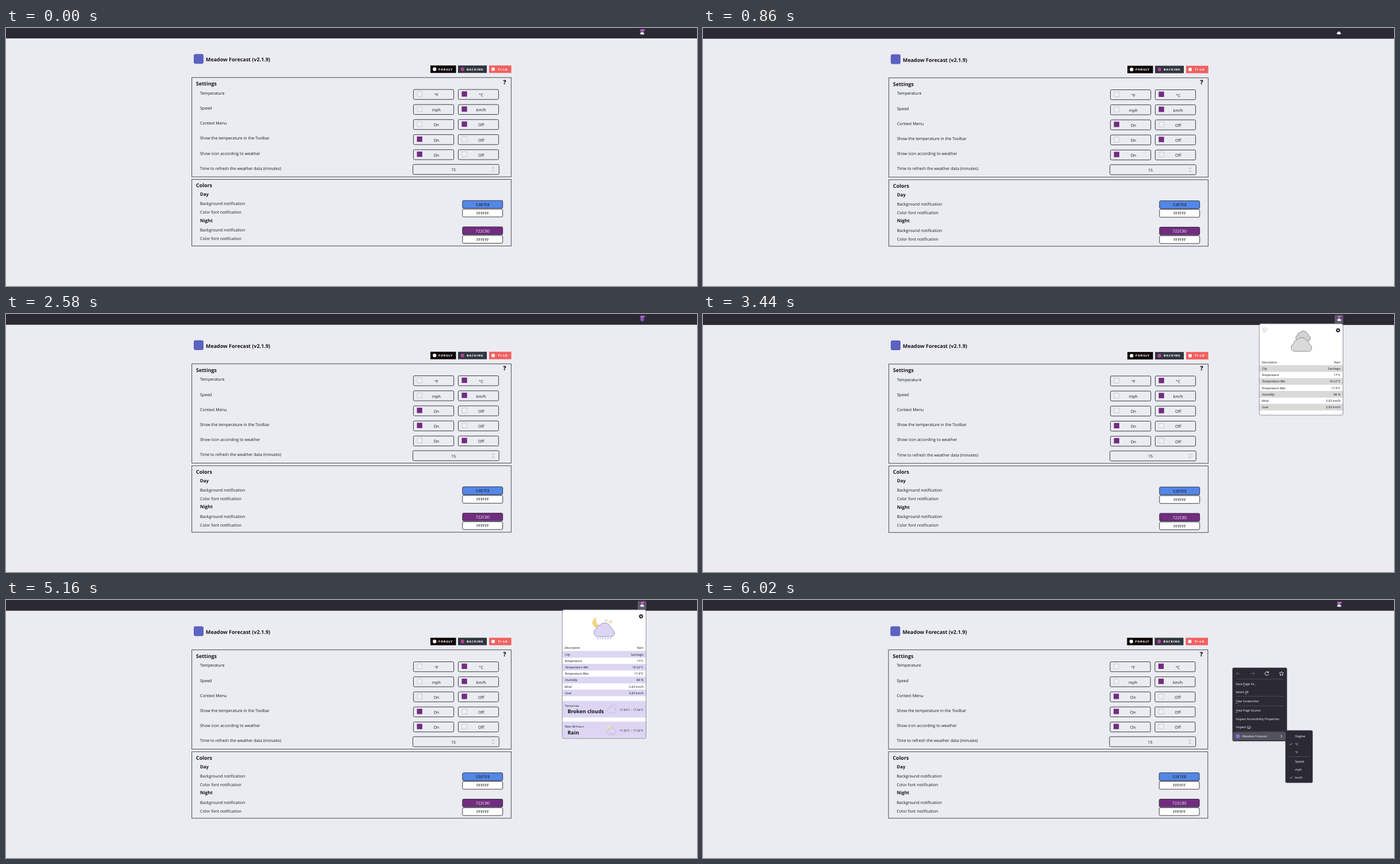
These frames come from a looping animation (1200x449 px, 6880 ms). An HTML page:

```html
<!DOCTYPE html>
<html lang="en">
<head>
<meta charset="utf-8">
<title>Weather settings</title>
<style>
  html, body { margin: 0; width: 100%; height: 100%; overflow: hidden; background: #ebecf2; }
  svg { display: block; width: 100vw; height: 100vh; }
  text { font-family: "Open Sans", "Noto Sans", sans-serif; font-size: 7.05px; fill: #15141a; text-rendering: geometricPrecision; white-space: pre; }
  .b { font-weight: 700; font-size: 8.95px; }
  .sub { font-weight: 700; font-size: 7.9px; }
  .badge { font: 700 4.8px "DejaVu Sans", sans-serif; letter-spacing: .7px; fill: #fff; }
  .row { font-size: 5.4px; }
  .it { font-style: italic; }
  .small { font-size: 5.1px; }
  .menu { font-size: 5.3px; fill: #fbfbfe; }
  .u { text-decoration: underline; text-decoration-thickness: .5px; }
  .mid { text-anchor: middle; }
  .end { text-anchor: end; }
</style>
</head>
<body>
<svg id="stage" viewBox="0 0 1200 449" preserveAspectRatio="none"></svg>
<script>
const STEP = 860;
const PURPLE = '#722c80', INK = '#2b2a33', LILAC = '#dcd6f3';
const CLOUD = 'M7 26A7 7 0 0 1 5 12.5A6 6 0 0 1 11 6A10 10 0 0 1 28 8A7 7 0 0 1 32 14A6.3 6.3 0 0 1 31 26Z';

// picks: chosen side per row (0 left, 1 right)
const states = [
  { picks: '01100', dx: 0, dy: 0, bar: 18.1, icon: 'cloud', badge: 1 },
  { picks: '11010', dx: 0, dy: .5, bar: 18.7, icon: 'cloud' },
  { picks: '11011', dx: 0, dy: .8, bar: 18.7, icon: 'dot' },
  { picks: '11001', dx: 0, dy: .5, bar: 18.7, icon: 'dot', badge: 1 },
  { picks: '11100', dx: 0, dy: .9, bar: 19.1, icon: 'cloud', badge: 1, popup: 'grey' },
  { picks: '11100', dx: 0, dy: .5, bar: 18.7, icon: 'cloud', badge: 1, popup: 'lilac' },
  { picks: '11100', dx: 0, dy: .5, bar: 18.7, icon: 'cloud', badge: 1, popup: 'lilac', forecast: 1 },
  { picks: '11000', dx: -.6, dy: .5, bar: 18.7, icon: 'cloud', badge: 1, menu: 1 }
];
states[0].picks = '11100';

const rect = (x, y, w, h, fill, more = '') =>
  `<rect x="${x}" y="${y}" width="${w}" height="${h}" fill="${fill}" ${more}/>`;
const text = (x, y, s, cls = '', more = '') => `<text x="${x}" y="${y}" class="${cls}" ${more}>${s}</text>`;
const line = (d, stroke, w = 1, more = '') => `<path d="${d}" fill="none" stroke="${stroke}" stroke-width="${w}" ${more}/>`;
const circle = (x, y, r, fill, more = '') => `<circle cx="${x}" cy="${y}" r="${r}" fill="${fill}" ${more}/>`;
const cloud = (x, y, k, fill, stroke, w = 1) =>
  `<path transform="translate(${x} ${y}) scale(${k})" d="${CLOUD}" fill="${fill}" stroke="${stroke}" stroke-width="${w / k}"/>`;
const box = (x, y, w, h, fill = 'none') => rect(x, y, w, h, fill, `rx="2" stroke="${INK}" stroke-width=".9"`);

function header() {
  const badges = [
    [737, 44.5, '#0d0405', 'FORGLY', 751],
    [785, 50, '#30363d', 'BACKING', 800],
    [839, 38.5, '#f16061', 'TI-LO', 854]
  ];
  return rect(326, 45.2, 17, 17, '#5c62c0', 'rx="3"') +
    text(347, 58.2, 'Meadow Forecast (v2.1.9)', 'b') +
    badges.map(([x, w, fill, label, tx]) => rect(x, 65.2, w, 13, fill) + text(tx, 73.6, label, 'badge')).join('') +
    circle(744.3, 71.7, 3.1, '#fff') + circle(792.7, 71.7, 3.1, '#b4439b') + rect(843.3, 69, 5.4, 5.4, '#fff');
}

function option(x, y, label, on) {
  return box(x, y, 70, 17.3) +
    (on ? rect(x + 6, y + 3.2, 9.3, 9.3, PURPLE)
        : rect(x + 6.4, y + 3.6, 8.7, 8.7, '#eeeef4', 'stroke="#c3c3cb" stroke-width=".8"')) +
    text(x + 39.7, y + 12, label, 'mid');
}

function settings(picks) {
  const rows = [
    ['Temperature', '°F', '°C'],
    ['Speed', 'mph', 'km/h'],
    ['Context Menu', 'On', 'Off'],
    ['Show the temperature in the Toolbar', 'On', 'Off'],
    ['Show icon according to weather', 'On', 'Off']
  ];
  let s = rect(322.7, 86.2, 554.6, 172.8, 'none', 'stroke="#4a4a52" stroke-width="1"') +
    text(330, 100.1, 'Settings', 'b') + text(866, 97.6, '?', 'b mid', 'style="font-size:10.5px;font-weight:800"');
  rows.forEach(([label, left, right], i) => {
    const y = 107 + i * 26.2;
    s += text(337, y + 8.8, label) +
      option(707.6, y, left, picks[i] === '0') + option(785.4, y, right, picks[i] === '1');
  });
  return s + text(337, 246.9, 'Time to refresh the weather data (minutes)') +
    box(706.6, 237.4, 149.6, 17.4) + text(777, 249.2, '15', 'mid') +
    line('M844 244.6l2-2l2 2M844 247.6l2 2l2-2', '#8f8f98', .8);
}

function colors() {
  const rows = [
    ['Background notification', 300.2, '#5387e8', '5387E8', '#15141a'],
    ['Color font notification', 315.2, '#fff', 'FFFFFF', '#15141a'],
    ['Background notification', 346, PURPLE, '722C80', '#f4eef6'],
    ['Color font notification', 361, '#fff', 'FFFFFF', '#15141a']
  ];
  return rect(322.7, 263.5, 554.6, 115.8, 'none', 'stroke="#4a4a52" stroke-width="1"') +
    text(330, 277, 'Colors', 'b') + text(337, 292.4, 'Day', 'sub') + text(337, 337.9, 'Night', 'sub') +
    rows.map(([label, y, fill, code, ink]) => text(337, y + 8.2, label) + box(792.8, y, 69.8, 13.6, fill) +
      text(827.8, y + 9.7, code, 'mid', `style="fill:${ink}"`)).join('');
}

function toolbar(s) {
  const y = s.dy;
  let out = rect(0, 0, 1200, s.bar, INK);
  if (s.popup) out += rect(1097, 1.5, 15, 15.5, '#5b5a66', 'rx="2"');
  if (s.icon === 'dot') out += circle(1104.8, (s.badge ? 9 : 8.5) + y, s.badge ? 3.2 : 4, '#6a62c4');
  else if (s.badge) out += cloud(1101.2, 6.1 + y, .2, '#e8e2f6', '#b9a9d6', .4);
  else out += cloud(1100.6, 5.2 + y, .2, '#f0eef8', '#c9c6d8', .3);
  if (s.badge) out += rect(1100.8, 2 + y, 9, 5, PURPLE) +
    text(1105.3, 6.1 + y, '17°', 'mid', 'style="font-size:4.6px;font-weight:700;fill:#fff"');
  return out;
}

const star = (x, y, r) => `<path d="M${x} ${y - r}Q${x} ${y} ${x + r} ${y}Q${x} ${y} ${x} ${y + r}Q${x} ${y} ${x - r} ${y}Q${x} ${y} ${x} ${y - r}Z" fill="#f6cf9a" stroke="#e3b27c" stroke-width=".4"/>`;

function greySky() {
  return cloud(1029, 28, .72, '#d2d2d2', '#8b8b8b') + cloud(1021, 39, 1, '#dadada', '#8b8b8b') +
    circle(975.3, 26.8, 2.3, 'none', 'stroke="#aaa" stroke-width=".6"') +
    circle(975.3, 26.8, 4.2, 'none', 'stroke="#999" stroke-width="1" stroke-dasharray=".8 1.9"') +
    line('M974 30l-.8 2M976.6 30l-.8 2', '#999', .6);
}

function nightSky() {
  let rain = '';
  for (let i = 0; i < 6; i++) rain += `M${1029 + i * 4.4} 65l-2.2 3.4`;
  return '<path d="M1025 31.5A8.5 8.5 0 1 0 1034 45A9.5 9.5 0 0 1 1025 31.5Z" fill="#f8d77c" stroke="#dfb45c" stroke-width=".6"/>' +
    star(1042.5, 35.5, 2.6) + star(1050, 38, 3.2) + star(1046, 42, 1.4) +
    cloud(1020.7, 37.7, 1, LILAC, '#9188bd', .9) + line(rain, '#8d80bd', .9);
}

function forecast() {
  const card = (y, when, what, range) => rect(966.5, y, 144.5, 29, LILAC) +
    text(970.5, y + 10, when, 'small') + text(975.2, y + 21.8, what, 'b') +
    text(1107, y + 17, range, 'end', 'style="font-size:5px"');
  return card(175.5, 'Tomorrow', 'Broken clouds', '17.54°C ~ 17.54°C') +
    cloud(1048, 180.5, .33, LILAC, '#b9b3d3', .6) + cloud(1043.8, 184.6, .44, LILAC, '#b0a9cd', .6) +
    card(211.7, 'Next 48 hours', 'Rain', '17.32°C ~ 17.32°C') +
    circle(1046.2, 222, 3.4, '#f4dfae') + star(1053, 220, 1.3) +
    cloud(1043.8, 221.4, .43, LILAC, '#b0a9cd', .6) +
    line('M1047 234l-1 1.6M1050 234l-1 1.6M1053 234l-1 1.6M1056 234l-1 1.6', '#aaa2cb', .6);
}

function popup(theme, full) {
  const rows = [
    ['Description', 'Rain'], ['City', 'Santiago'], ['Temperature', '17°C'], ['Temperature Min', '16.52°C'],
    ['Temperature Max', '17.4°C'], ['Humidity', '88 %'], ['Wind', '5.83 km/h'], ['Gust', '5.83 km/h']
  ];
  const grey = theme === 'grey', shift = grey ? 0 : -.4;
  let s = rect(966, 17, 145.5, full ? 224 : 159, '#fff', 'rx="3"') + (grey ? greySky() : nightSky()) +
    circle(1102.8, 28.4, 2.1, 'none', 'stroke="#15141a" stroke-width="1.6"') +
    circle(1102.8, 28.4, 3.2, 'none', 'stroke="#15141a" stroke-width="1.2" stroke-dasharray="1.35 1.16"');
  rows.forEach(([key, value], i) => {
    const y = 78.2 + i * 11.2 + shift, odd = i % 2;
    if (odd) s += rect(966.5, y - .3, 144.5, 11.6, grey ? '#d9d9d9' : LILAC);
    s += text(970 + odd, y + 7.6, key, 'row it') + text(1107, y + 7.6, value, 'row end');
  });
  if (full) s += forecast();
  return s + rect(966, 17, 145.5, full ? 224 : 159, 'none', 'rx="3" stroke="#85858f" stroke-width=".9"');
}

function menu() {
  const u = c => `<tspan class="u">${c}</tspan>`;
  const items = [
    [148, `Save ${u('P')}age As...`], [162, `Select ${u('A')}ll`], [178, `${u('T')}ake Screenshot`],
    [194.4, `${u('V')}iew Page Source`], [208.5, 'Inspect Accessibility Properties'], [222.6, `Inspect (${u('Q')})`]
  ];
  const side = [[238.8, 'Degree'], [252.6, '°C'], [266.7, '°F'], [283, 'Speed'], [297.2, 'mph'], [311.2, 'km/h']];
  const panel = (x, y, w, h) => rect(x, y, w, h, INK, 'rx="2" stroke="#53525c" stroke-width=".7"');
  const rule = (x, y, w) => line(`M${x} ${y}h${w}`, '#5c5b66', .7);
  let starPath = '';
  for (let i = 0; i < 10; i++) {
    const a = i * Math.PI / 5, r = i % 2 ? 1.9 : 4;
    starPath += `${i ? 'L' : 'M'}${1004.6 + r * Math.sin(a)} ${128.2 - r * Math.cos(a)}`;
  }
  return panel(919.6, 118, 94.4, 127.6) +
    line('M932.3 128h-6.4m2.6-2.7l-2.7 2.7l2.7 2.7M951.2 128h6.4m-2.6-2.7l2.7 2.7l-2.7 2.7', '#74737d', .8) +
    line('M981.4 125.7A3.2 3.2 0 1 0 982.3 128.4M982 123.9v2.5h-2.5', '#fbfbfe', .9) +
    line(starPath + 'Z', '#fbfbfe', .8) +
    rule(925, 137.6, 83.5) + rule(925, 167.6, 83.5) + rule(925, 184.2, 83.5) + rule(925, 229, 83.5) +
    items.map(([y, s]) => text(925.2, y, s, 'menu')).join('') +
    rect(920, 230, 93.6, 14, '#52525e') + circle(928.8, 237, 3.8, '#7d72cf') +
    text(936.3, 238.9, 'Meadow Forecast', 'menu') + line('M1003 234.4l2.6 2.6l-2.6 2.6', '#fbfbfe', .8) +
    panel(1011.6, 227, 47, 91) + rule(1017, 272.4, 36) +
    side.map(([y, s]) => text(1028.3, y, s, 'menu')).join('') +
    [250.6, 309.1].map(y => line(`M1018.6 ${y}l1.6 1.7l3.2-3.6`, '#d5d5da', .7)).join('');
}

const scene = s => rect(0, 0, 1200, 449, '#ebecf2') + toolbar(s) +
  `<g transform="translate(${s.dx} ${s.dy})">${header()}${settings(s.picks)}${colors()}</g>` +
  (s.popup ? popup(s.popup, s.forecast) : '') + (s.menu ? menu() : '');

const stage = document.getElementById('stage');
const start = performance.now();
let shown = -1;
function draw(now) {
  const i = Math.floor(Math.max(0, now - start) / STEP) % states.length;
  if (i !== shown) stage.innerHTML = scene(states[shown = i]);
  requestAnimationFrame(draw);
}
draw(start);
</script>
</body>
</html>
```
